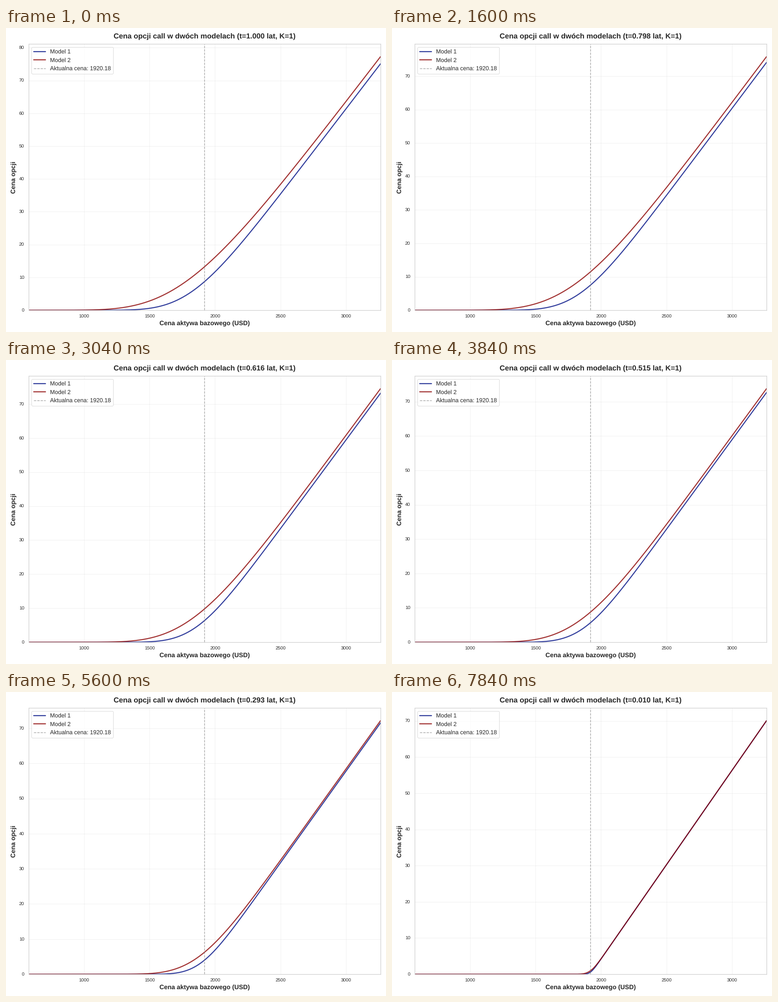
These frames come from a looping animation (837 by 669 pixels, 8000 ms). A matplotlib script:

```python
import math

import matplotlib.pyplot as plt
import numpy as np
from matplotlib.animation import FuncAnimation
from matplotlib.ticker import MultipleLocator

W, H, DPI = 837, 669, 96
UNIT = 83.7 / DPI          # layout designed for a 10 inch wide figure
FRAMES, STEP_MS = 50, 160
SPOT = 1920.18
INK = "0.15"

MODELS = [
    # label, colour, rate, volatility
    ("Model 1", "#000f85", 0.0525, 0.15),
    ("Model 2", "#8b0000", 0.075, 0.24),
]

times = np.linspace(1, 0.01, FRAMES)
prices = np.linspace(0.3 * SPOT, 1.7 * SPOT, 500)
erf = np.vectorize(math.erf)


def pt(size):
    return size * UNIT


def cdf(x):
    return 0.5 * (1 + erf(x / math.sqrt(2)))


def call(price, t, rate, vol):
    """Call value in percent of the spot, struck at the money."""
    m = price / SPOT
    s = vol * math.sqrt(t)
    d1 = (np.log(m) + rate * t) / s + s / 2
    return 100 * (m * cdf(d1) - math.exp(-rate * t) * cdf(d1 - s))


plt.rcParams.update({
    "font.family": "Liberation Sans",
    "text.hinting": "none",
    "text.color": INK,
    "axes.labelcolor": INK,
    "axes.edgecolor": "0.8",
    "axes.linewidth": pt(1),
    "patch.linewidth": pt(0.8),
    "lines.solid_capstyle": "round",
    "toolbar": "None",
})

fig = plt.figure(figsize=(W / DPI, H / DPI), dpi=DPI, facecolor="white")
left, right, top, bottom = 49.9, 824.9, 35.2, 621.1
ax = fig.add_axes([left / W, 1 - bottom / H, (right - left) / W, (bottom - top) / H])
ax.set_axisbelow(True)
ax.set_xlim(prices[0], prices[-1])
ax.xaxis.set_major_locator(MultipleLocator(500))
ax.yaxis.set_major_locator(MultipleLocator(10))
ax.tick_params(length=0, pad=pt(8.3), labelsize=pt(8.8), labelcolor=INK)
ax.grid(True, color="0.8", alpha=0.3, linewidth=pt(0.8))

label_style = dict(fontsize=pt(12), fontweight="bold")
ax.set_xlabel("Cena aktywa bazowego (USD)", labelpad=pt(3.3), **label_style)
ax.set_ylabel("Cena opcji", labelpad=pt(4), **label_style)
title = ax.set_title("", fontsize=pt(14), fontweight="bold", pad=pt(10))

curves = [
    ax.plot([], [], color=color, alpha=0.8, linewidth=pt(2), label=label)[0]
    for label, color, _, _ in MODELS
]
ax.axvline(SPOT, color="gray", linestyle="--", alpha=0.7, linewidth=pt(1.2),
           snap=False, label=f"Aktualna cena: {SPOT:.2f}")
ax.legend(loc="upper left", fontsize=pt(11), framealpha=0.8, edgecolor="0.8")


def update(i):
    t = times[i]
    peak = 0
    for curve, (_, _, rate, vol) in zip(curves, MODELS):
        values = call(prices, t, rate, vol)
        curve.set_data(prices, values)
        peak = max(peak, values.max())
    ax.set_ylim(0, 1.05 * peak)
    title.set_text(f"Cena opcji call w dwóch modelach (t={t:.3f} lat, K=1)")
    return [*curves, title]


anim = FuncAnimation(fig, update, frames=FRAMES, interval=STEP_MS,
                     init_func=lambda: update(0), repeat=True,
                     repeat_delay=0, blit=False)
plt.show()
```
